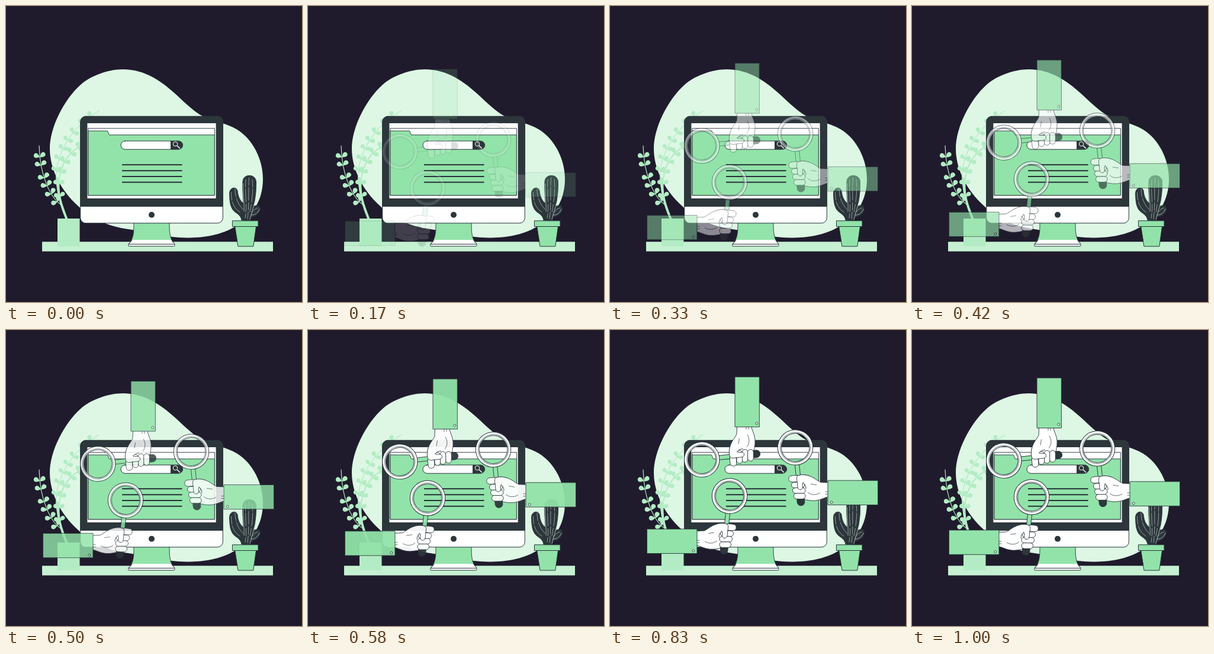
These frames come from a looping animation (500 by 500 pixels, 1040 ms). An HTML page with a canvas:

```html
<!DOCTYPE html>
<html lang="en">
<head>
<meta charset="utf-8">
<title>Search desk</title>
<style>
html, body { margin: 0; width: 100%; height: 100%; overflow: hidden; background: #1f1b2c; }
canvas { display: block; width: 500px; height: 500px; }
</style>
</head>
<body>
<canvas id="stage" width="500" height="500"></canvas>
<script>
const BG = '#1f1b2c', INK = '#263238', DARK = '#2c363b', WHITE = '#fff';
const GREEN = '#92e3a9', LEAF = '#b3ecc4', PALE = '#def7e5', SHELF = '#c6f0d2';
const LOOP = 1040, FRAME = 1000 / 24;

const stage = document.getElementById('stage');
const out = stage.getContext('2d');

function makeLayer() {
  const c = document.createElement('canvas');
  c.width = c.height = 500;
  return c;
}

function shape(g, d, fill, line, width = 0.9) {
  const p = typeof d === 'string' ? new Path2D(d) : d;
  if (fill) { g.fillStyle = fill; g.fill(p, 'evenodd'); }
  if (line) { g.strokeStyle = line; g.lineWidth = width; g.stroke(p); }
}

function box(x, y, w, h, r = 0) {
  const p = new Path2D();
  p.roundRect(x, y, w, h, r);
  return p;
}

function disc(x, y, r, inner) {
  const p = new Path2D();
  p.arc(x, y, r, 0, 7);
  if (inner) { p.moveTo(x + inner, y); p.arc(x, y, inner, 0, 7); }
  return p;
}

function leaf(g, x, y, angle, size) {
  g.save();
  g.translate(x, y);
  g.rotate(angle);
  g.scale(size, size);
  shape(g, 'M0 0C3 -1 4 -4.5 8 -4.4C12.5 -4 12.800 2.500 9 3.700C6 4.300 3 2 0 0Z', LEAF);
  g.restore();
}

// Cubic stem from p[0] to p[3] with leaf pairs at the given positions
function branch(g, p, width, spots, size) {
  const [a, b, c, d] = p;
  shape(g, `M${a}C${b} ${c} ${d}`, null, LEAF, width);
  for (const t of spots) {
    const u = 1 - t;
    const at = i => u * u * u * a[i] + 3 * u * u * t * b[i] + 3 * u * t * t * c[i] + t * t * t * d[i];
    const slope = i => u * u * (b[i] - a[i]) + 2 * u * t * (c[i] - b[i]) + t * t * (d[i] - c[i]);
    const dir = Math.atan2(slope(1), slope(0));
    leaf(g, at(0), at(1), dir - 1, size);
    leaf(g, at(0), at(1), dir + 1, size);
  }
}

function drawPlant(g) {
  g.lineCap = 'round';
  shape(g, 'M103 361C96 343 87 322 87 292', null, LEAF, 4);
  branch(g, [[95, 337], [76, 326], [57, 288], [56, 236]], 1.2, [0.14, 0.33, 0.48, 0.6, 0.77, 0.87], 0.95);
  branch(g, [[87, 308], [78, 270], [96, 214], [157, 177]], 1.4, [0.24, 0.38, 0.5, 0.6, 0.7, 0.81, 0.91], 0.85);
  branch(g, [[92, 328], [84, 290], [94, 252], [128, 236]], 2.2, [0.05, 0.24, 0.42, 0.6, 0.78, 0.93], 0.9);
  shape(g, box(87, 359, 37.5, 47), LEAF);
}

function drawMonitor(g) {
  // stand
  shape(g, 'M216 365H276C276 381 276 393 285 402H207C216 393 216 381 216 365Z', GREEN, INK);
  shape(g, 'M213 395H279.5C281 398 283 400 285 402H207C209.500 400 211.500 398 213 395Z', WHITE);
  shape(g, 'M213 395C211.500 398 209.500 400 207 402M279.500 395C281 398 283 400 285 402', null, INK);
  shape(g, box(206.5, 402.3, 78.5, 3.5, 1.5), WHITE, INK, 1);

  // case
  shape(g, box(125.7, 186.3, 240.6, 180.5, 9), WHITE, INK, 1);
  shape(g, box(125.2, 186, 241.6, 153, [10, 10, 0, 0]), DARK);
  shape(g, disc(246, 352.7, 5), DARK);

  // screen
  shape(g, box(137.4, 198, 217.2, 127), WHITE);
  shape(g, box(139.3, 206.7, 213, 113.1), null, INK, 0.9);
  shape(g, 'M139.300 211H171.500L174.500 217.800H352.300V319.800H139.300Z', GREEN, INK, 0.9);
  shape(g, box(194, 228, 104.5, 14.2, 7.1), WHITE, INK, 1);
  shape(g, box(278, 228, 20.7, 14.2, [0, 7.1, 7.1, 0]), DARK);
  shape(g, disc(286, 233, 3.7), null, WHITE, 1);
  shape(g, 'M289 236L293.500 240.300', null, WHITE, 1.4);
  g.fillStyle = INK;
  for (const y of [268.2, 278.2, 288, 297.7]) g.fillRect(196, y - 1, 101.5, 2);
}

function drawCactus(g) {
  const pale = '#d8dedc';
  shape(g, 'M411 362L412 344C417 338 424 335 428.500 338C432 344 427 355 414 357Z', DARK, INK);
  shape(g, 'M377.500 318C376.500 306 389 304 391 312C392 323 396 330 402 334L408 362H398C396 351 388 351 383 344C378 336 378 328 377.500 318Z', DARK, INK);
  shape(g, 'M400 362C404 340 398 312 400 296C401 283 422 283 422.500 297C423 316 420 338 411 362Z', DARK, INK);
  shape(g, 'M400.500 300C400 318 403 332 402 347M412 361C414 352 418 340 420 332M414 353C420 354 426 349 428 343', null, pale, 0.7);
  g.setLineDash([13, 3, 22, 4]);
  shape(g, 'M405 293C403 315 408 335 404 358M410.500 290C409 315 411 337 408 359M416 293C418 315 415 333 412 348', null, pale, 0.6);
  shape(g, 'M380.500 315C380.500 334 386 343 398 350M387 309C387 325 393 337 402 345M415 349C418 344 423 341 427 341', null, pale, 0.6);
  g.setLineDash([]);
  shape(g, 'M387 372.500H422.500L417.800 406H392.300Z', GREEN, INK, 1);
  shape(g, box(382.8, 362.8, 43.2, 9.7), GREEN, INK, 1);
}

function drawScene(g) {
  g.fillStyle = BG;
  g.fillRect(0, 0, 500, 500);
  shape(g, 'M197 107C236 107 264 128 290 152C308 169 322 182 338 189C350 194 372 198 390 208.500C417 225 434 259 434 292C434 330 415 356 388 372C362 388 332 391.500 305 391.500C270 391.500 235 381 200 376C165 370 140 355 122 338C92 311 74 275 74 241C74 205 98 158 126 133C143 118 172 107 197 107Z', PALE);
  shape(g, box(61, 398.3, 390, 16.2), SHELF);
  drawPlant(g);
  drawMonitor(g);
  drawCactus(g);
}

function drawGlass(g) {
  g.save();
  g.translate(313, 200.2);
  g.rotate(-0.103);
  shape(g, box(-3.6, 29, 7.2, 60), GREEN, INK);
  shape(g, box(-6.3, 76, 12.6, 22.8, 6), DARK, INK);
  shape(g, disc(0, 0, 29.7, 23.8), WHITE);
  shape(g, disc(0, 0, 29.7), null, INK, 1);
  shape(g, disc(0, 0, 25.6), null, INK, 0.6);
  shape(g, disc(0, 0, 23.8), null, INK, 1);
  g.restore();
}

function drawArm(g) {
  // palm and wrist
  shape(g, 'M369 259.500L356 259C349 256 344 249.500 332 247C326 246 320 246 315 248L312 268L318 287C327 287 336 291 347 290C356 289 362 285 369 283.500Z', WHITE, INK);
  drawGlass(g);
  // fingers wrapped round the handle
  shape(g, box(310.5, 277.5, 19.5, 9.8, 4.7), WHITE, INK);
  shape(g, box(308.5, 268.3, 21.5, 9.4, 4.6), WHITE, INK);
  shape(g, box(306.5, 259, 22, 9.5, 4.6), WHITE, INK);
  shape(g, 'M322 247.500C315 247 309 247.500 304.500 248.500C300.500 250.500 301 258 306 258.500C311 259 316 258 321 257Z', WHITE, INK);
  // thumb
  const thumb = 'M337 248.500C331 246 322 245.500 317 248C314 251 316 256 316.500 261C316.500 266 317 271 320.500 271.500C325 272 326 268 325 264L326 259.500C329 262 331 265 331 270';
  shape(g, thumb + 'L333 280L342 270Z', WHITE);
  shape(g, thumb, null, INK);
  // creases
  shape(g, 'M334 276C340 281 348 281 355 277M339 262L349 263.500M369 275H363.500M369 279H363.500', null, INK, 0.7);
  // sleeve
  shape(g, box(368, 256, 84.6, 41.3), GREEN, INK);
  shape(g, disc(374.2, 292.8, 1.9), WHITE, INK);
}

// The same arm reaching in from the right, the left and the top
const PLACES = [
  [1, 0, 0, 1, 0, 0],
  [-1, 0, 0, 1, 515, 82],
  [0, -1, 1, 0, -45, 533.6]
];

// cubic-bezier(.36, -.01, .5, 1.38)
function ease(x) {
  if (x >= 1) return 1;
  const curve = (u, a, b) => 3 * (1 - u) * (1 - u) * u * a + 3 * (1 - u) * u * u * b + u * u * u;
  let lo = 0, hi = 1;
  for (let i = 0; i < 30; i++) {
    const mid = (lo + hi) / 2;
    if (curve(mid, 0.36, 0.5) < x) lo = mid; else hi = mid;
  }
  return curve(lo, -0.01, 1.38);
}

const scene = makeLayer();
drawScene(scene.getContext('2d'));
const arms = makeLayer();
const ag = arms.getContext('2d');

function render(ms) {
  const step = Math.floor((ms + 4) / FRAME);
  const k = step < 2 ? 0 : ease(Math.min(1, (step + 1) / 24));
  out.globalAlpha = 1;
  out.drawImage(scene, 0, 0);
  if (k <= 0) return;

  ag.setTransform(1, 0, 0, 1, 0, 0);
  ag.clearRect(0, 0, 500, 500);
  for (const [a, b, c, d, x, y] of PLACES) {
    ag.setTransform(a, b, c, d, x, y + 30 * (1 - k));
    drawArm(ag);
  }
  out.globalAlpha = Math.min(1, k);
  out.drawImage(arms, 0, 0);
}

const start = performance.now();
function tick() {
  render((performance.now() - start) % LOOP);
  requestAnimationFrame(tick);
}
tick();
</script>
</body>
</html>
```
